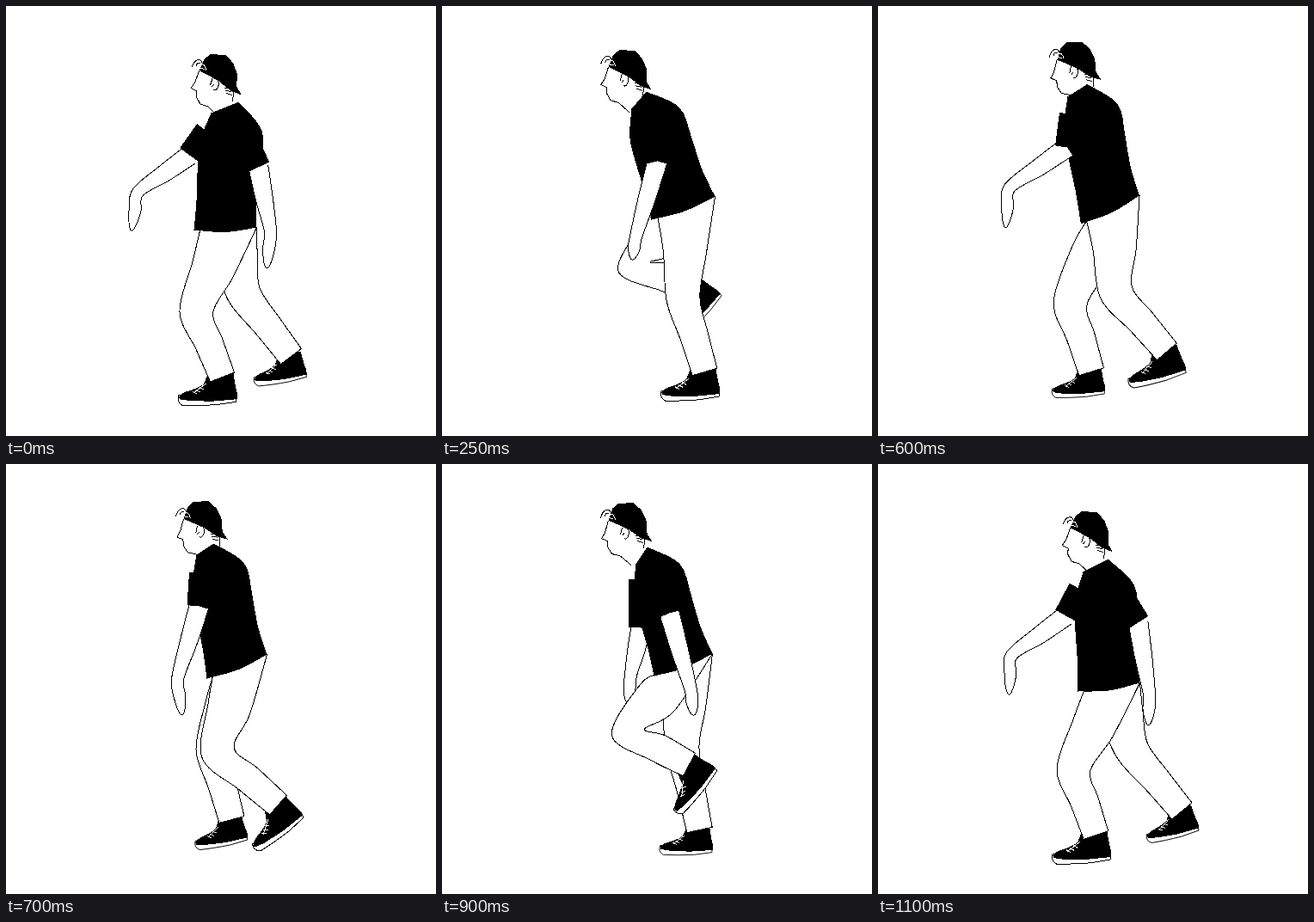
Write an HTML page that moves like this. It is 500 px wide and 500 px high and loops after 1.15 s.

```html
<!DOCTYPE html>
<html lang="en">
<head>
<meta charset="utf-8">
<title>Walk cycle</title>
<style>
html, body { margin: 0; width: 100%; height: 100%; overflow: hidden; background: #fff; }
svg { display: block; width: 100%; height: 100%; }
.line { fill: none; stroke: #000; }
.skin { fill: #fff; stroke: #000; stroke-linejoin: round; }
.lace { fill: none; stroke: #fff; }
</style>
</head>
<body>
<svg viewBox="0 0 500 500" shape-rendering="crispEdges">
  <defs>
    <g id="shoe">
      <path class="skin" d="M1,-11Q-2,-3 5,1Q22,2 45,1L68,-2V-10Z"/>
      <path d="M1,-9Q5,-14 14,-16Q24,-19 30,-23L36,-36H65Q67,-18 69,-12V-5L40,-3 14,-4 2,-6Z"/>
      <path class="lace" d="M17,-15l5,3M21,-17l5,3M25,-20l5,3M18,-13L33,-24"/>
    </g>
  </defs>
  <g transform="translate(.5 .5)">
    <path id="farArm" class="skin"/>
    <use id="farShoe" href="#shoe"/>
    <path id="farLeg" class="skin"/>
    <use id="nearShoe" href="#shoe"/>
    <path id="nearLeg" class="skin"/>
    <g id="head">
      <path class="line" d="M198,66L194,80 190,87 197,90V97L202,105 211,107 224,118M240,86L239,99"/>
      <path class="line" d="M214,74L212,82M214,84L216,81M217,74Q224,76 221,84Q219,89 216,87M229,84h7M230,87l7,1M231,90l7,2"/>
      <path d="M198,66L203,52 210,46H228L237,55 242,66 243,82 249,91 236,87 222,77 207,70Z"/>
      <path class="line" d="M189,63Q192,52 199,54L203,60M194,61Q195,56 199,58"/>
      <path class="lace" d="M200,59Q204,57 206,65M199,63L204,64"/>
    </g>
    <path id="shirt"/>
    <path id="farSleeve"/>
    <path id="nearArm" class="skin"/>
    <path id="nearSleeve"/>
  </g>
</svg>
<script>
const LOOP = 1150, STEP = 50;

// Rows start with their time in ms.
// Body: head shift, collar front and back, hem front and back
const body = [
  [0, 26,10, 238,124, 270,111, 218,260, 291,257],
  [150, 0,0, 220,118, 240,96, 248,252, 313,219],
  [250, -5,5, 220,119, 237,99, 243,248, 317,221],
  [450, 8,-5, 219,109, 244,90, 242,257, 308,218],
  [700, 8,-3, 221,105, 241,92, 233,249, 303,221],
  [900, -5,-1, 225,116, 238,96, 246,246, 314,220],
  [1100, 25,9, 238,125, 267,110, 232,264, 304,254]
];
// Legs: knee, ankle, turn of the shoe in degrees
const nearLeg = [
  [0, 221,355, 251,431, -1],
  [150, 260,333, 262,427, -3],
  [250, 280,340, 305,425, -2],
  [450, 273,340, 317,420, -13],
  [575, 281,332, 337,403, -10],
  [700, 246,335, 316,396, -35],
  [900, 216,311, 287,349, -49],
  [1100, 227,355, 253,431, -2]
];
const farLeg = [
  [0, 277,336, 331,407, -8],
  [150, 262,330, 312,374, -38],
  [250, 223,302, 296,328, -45],
  [450, 224,322, 253,397, -23],
  [575, 221,345, 246,425, -2],
  [700, 240,332, 262,413, -9],
  [900, 279,330, 299,425, 0],
  [1100, 296,334, 353,403, -12]
];
// Arms: cuff, wrist, fingertip
const nearArm = [
  [0, 293,187, 307,262, 303,302],
  [150, 262,175, 258,255, 254,299],
  [250, 250,180, 225,268, 221,293],
  [450, 218,165, 169,248, 167,275],
  [575, 219,164, 147,207, 141,250],
  [700, 224,165, 199,250, 204,289],
  [900, 264,173, 289,263, 292,290],
  [1100, 302,184, 315,268, 314,301]
];
const farArm = [
  [0, 213,173, 153,216, 146,258],
  [150, 220,173, 202,250, 208,280],
  [450, 287,185, 303,248, 303,271],
  [900, 231,190, 219,245, 216,276],
  [1100, 218,176, 155,222, 152,265]
];

// Cubic Hermite through the rows, round the loop.
function valuesAt(rows, t) {
  const n = rows.length, i = rows.findLastIndex(r => r[0] <= t);
  const [a, b, c, d] = [i - 1, i, i + 1, i + 2].map(k => {
    const turn = Math.floor(k / n), [time, ...v] = rows[k - turn * n];
    return { t: time + turn * LOOP, v };
  });
  const span = c.t - b.t, u = (t - b.t) / span;
  return b.v.map((p, j) => {
    const q = c.v[j];
    const m = (q - a.v[j]) / (c.t - a.t) * span;
    const k = (d.v[j] - p) / (d.t - b.t) * span;
    return p + u * (m + u * (3 * (q - p) - 2 * m - k + u * (2 * (p - q) + m + k)));
  });
}

const mix = (a, b, f) => a.map((x, j) => x + (b[j] - x) * f);
const pairs = v => v.flatMap((x, i) => i % 2 ? [[v[i - 1], x]] : []);

function unit(a, b) {
  const x = b[0] - a[0], y = b[1] - a[1], len = Math.hypot(x, y) || 1;
  return [x / len, y / len];
}

// Step off p by dist, to the left as seen on a downward path.
const aside = (p, dir, dist) => [p[0] - dir[1] * dist, p[1] + dir[0] * dist];

// Smooth path data that continues from an opening M or L.
function curve(points, open = 'M') {
  const pt = i => points[Math.max(0, Math.min(points.length - 1, i))];
  let d = open + pt(0);
  for (let i = 0; i < points.length - 1; i++) {
    const [a, b, c, e] = [-1, 0, 1, 2].map(o => pt(i + o));
    const out = b.map((x, j) => x + (c[j] - a[j]) / 6);
    const into = c.map((x, j) => x - (e[j] - b[j]) / 6);
    d += `C${out} ${into} ${c}`;
  }
  return d;
}

// Both sides of a chain of joints with a width at each.
function sides(joints, widths) {
  const last = joints.length - 1;
  const dirs = joints.map((p, i) => {
    const before = unit(joints[Math.max(0, i - 1)], joints[Math.max(1, i)]);
    const after = unit(joints[Math.min(last - 1, i)], joints[Math.min(last, i + 1)]);
    return unit([0, 0], [before[0] + after[0], before[1] + after[1]]);
  });
  return [.5, -.5].map(s => joints.map((p, i) => aside(p, dirs[i], s * widths[i])));
}

// Evenly spaced points from a to b, each pushed out by its bulge.
function edge(a, b, bulges) {
  const dir = unit(a, b), n = bulges.length + 1;
  return [a, ...bulges.map((w, i) => aside(mix(a, b, (i + 1) / n), dir, w)), b];
}

const set = (id, name, value) => document.getElementById(id).setAttribute(name, value);

function drawLeg(side, rows, t, hemFront, hemBack, size) {
  const v = valuesAt(rows, t), [knee, ankle] = pairs(v);
  const hip = mix(hemFront, hemBack, .55);
  const [front, back] = sides(
    [hip, mix(hip, knee, .5), knee, mix(knee, ankle, .5), ankle], [62, 50, 39, 33, 30]);
  front[0] = mix(hemFront, hemBack, .1);
  back[0] = hemBack;
  set(side + 'Leg', 'd', curve(front) + curve(back.reverse(), 'L'));
  set(side + 'Shoe', 'transform',
    `translate(${ankle}) rotate(${v[4]}) scale(${size}) translate(-52 31)`);
}

function drawArm(side, rows, t, collar) {
  const [cuff, wrist, tip] = pairs(valuesAt(rows, t));
  const [left, right] = sides(
    [cuff, mix(cuff, wrist, .5), wrist, mix(wrist, tip, .5), tip], [23, 20, 14, 14, 5]);
  set(side + 'Arm', 'd', curve([...left, ...right.reverse()]));

  const shoulder = [(collar[0] + cuff[0]) / 2, collar[1] + 28];
  const [outer, inner] = sides([shoulder, cuff], [30, 28]);
  set(side + 'Sleeve', 'd', `M${outer.join('L')}L${inner.reverse().join('L')}Z`);
}

function draw(now) {
  const t = Math.floor(now % LOOP / STEP) * STEP;
  const [shift, collarFront, collarBack, hemFront, hemBack] = pairs(valuesAt(body, t));
  const collar = mix(collarFront, collarBack, .5);

  set('head', 'transform', `translate(${shift}) rotate(${shift[1] * .4} 219 68)`);
  set('shirt', 'd', curve(edge(collarFront, hemFront, [8, 6, 2])) +
    curve(edge(hemFront, hemBack, [4]), 'L') +
    curve(edge(hemBack, collarBack, [5, 15, 22]), 'L') + 'Z');
  drawLeg('near', nearLeg, t, hemFront, hemBack, 1);
  drawLeg('far', farLeg, t, hemFront, hemBack, .9);
  drawArm('near', nearArm, t, collar);
  drawArm('far', farArm, t, collar);
}

const start = performance.now();
function tick() {
  draw(performance.now() - start);
  requestAnimationFrame(tick);
}
tick();
</script>
</body>
</html>
```
